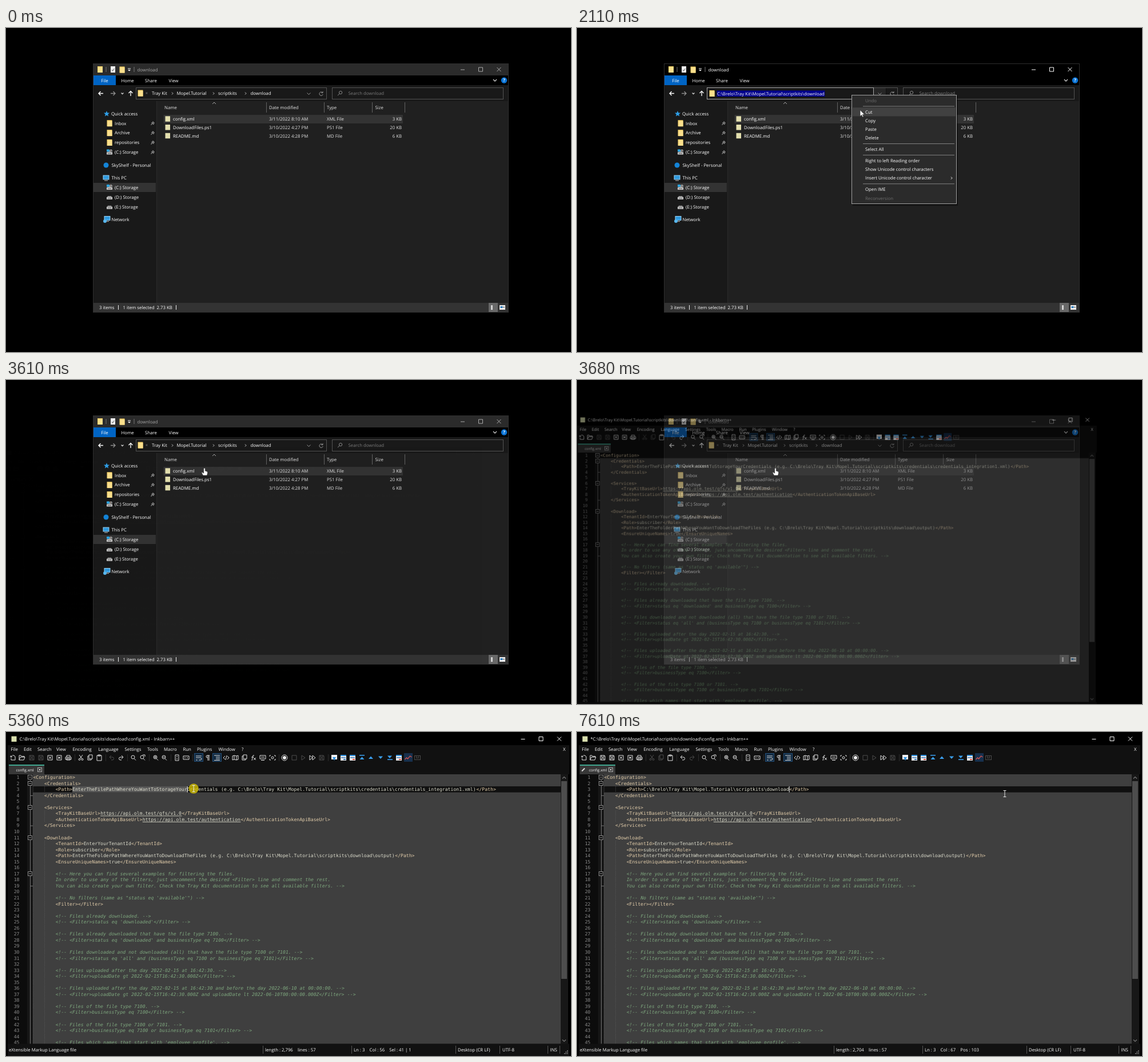
Write an HTML page with a canvas that moves like this. It is 988 px wide and 567 px high and loops after 8 s.

```html
<!DOCTYPE html>
<html lang="en">
<head>
<meta charset="utf-8">
<title>Editing a config file</title>
<style>
html, body { margin: 0; width: 100%; height: 100%; overflow: hidden; background: #000; }
canvas { display: block; }
</style>
</head>
<body>
<canvas id="stage" width="988" height="567"></canvas>
<script>
const LOOP = 8000, W = 988, H = 567;
const UI = '7.8px "Open Sans", sans-serif';
const SMALL = '6.5px "Open Sans", sans-serif';
const MONO = '8.15px "DejaVu Sans Mono", monospace';
const ITALIC = 'italic ' + MONO;
const CHROME = '#111';
const CHAR = 4.906, CODE_X = 47.4, ROW = 10.55, ROW_Y = 79.2;
const PATH_X = CODE_X + 14 * CHAR;
const FOLDER = String.raw`C:\Brelo\Tray Kit\Mopel.Tutorial\scriptkits\download`;

const screen = document.getElementById('stage').getContext('2d', { alpha: false });
const layer = Object.assign(document.createElement('canvas'), { width: W, height: H }).getContext('2d');
let g = screen;

// ---- drawing helpers ----
function box(x, y, w, h, color) { g.fillStyle = color; g.fillRect(x, y, w, h); }
function frame(x, y, w, h, color) { g.strokeStyle = color; g.lineWidth = 1; g.strokeRect(x + .5, y + .5, w - 1, h - 1); }
function text(s, x, y, color = '#fff', font = UI, align = 'left') {
  g.font = font; g.textAlign = align; g.fillStyle = color;
  g.fillText(s, x, y + 2.8);
}
// Keeps every word of code on the character grid.
function gridText(s, x, y, color, font) {
  for (const word of s.matchAll(/\S+/g)) text(word[0], x + word.index * CHAR, y, color, font);
}
function stroke(d, x, y, color = '#ddd', width = 1) {
  g.save(); g.translate(x, y);
  g.strokeStyle = color; g.lineWidth = width; g.stroke(new Path2D(d));
  g.restore();
}
function fill(d, x, y, color) {
  g.save(); g.translate(x, y);
  g.fillStyle = color; g.fill(new Path2D(d));
  g.restore();
}
function disc(x, y, r, color) {
  g.fillStyle = color; g.beginPath(); g.arc(x, y, r, 0, 7); g.fill();
}

const DOWN = 'M-3-1.5L0 1.5L3-1.5', UP = 'M-3 1.5L0-1.5L3 1.5', RIGHT = 'M-1-2L1 0L-1 2';
const CROSS = 'M-3.5-3.5l7 7M3.5-3.5l-7 7';

function windowButtons(y, xs, color) {
  stroke('M-3.5 0h7', xs[0], y + .5, color);
  stroke('M-3.5-3.5h7v7h-7z', xs[1], y, color);
  stroke(CROSS, xs[2], y, color);
}

// ---- file browser ----
function folder(x, y) {
  box(x - 4.5, y - 5.5, 9, 11, '#f3cf68');
  box(x - 3.5, y - 4, 8, 9.5, '#fbe08d');
}
function drive(x, y, system) {
  fill('M-4-1L-3-3H3L4-1z', x, y + 1, '#8d8d8d');
  box(x - 5, y, 10, 4, '#d0d0d0');
  box(x - 3.5, y + 1.5, 7, 1, '#555');
  if (system) { box(x - 5, y - 5, 5, 4, '#2ba4e0'); stroke('M1-1v-3h3v3', x, y, '#ddd'); }
}
function monitor(x, y) {
  box(x - 5.5, y - 5, 11, 8, '#9bd0f0');
  box(x - 4.5, y - 4, 9, 6, '#2f9be0');
  box(x - 3, y + 4, 6, 1, '#bbb');
}

function sidebar() {
  fill('M0-5L1.4-1.6L5-1.4L2.2.9L3.1 4.5L0 2.5L-3.1 4.5L-2.2.9L-5-1.4L-1.4-1.6z', 176, 150, '#2f9fe8');
  text('Quick access', 184, 150);
  ['Inbox', 'Archive', 'repositories', '(C:) Storage'].forEach((name, i) => {
    const y = 166.7 + i * 16.9;
    i < 3 ? folder(181, y) : drive(181, y, true);
    text(name, 190, y);
    stroke('M-3 3L-1 1M-2-1L2 2M0-3L3 0M-1-1L1-2.5M1 1L2.5-.5', 256.5, y, '#999', 1.2);
  });
  disc(175, 240, 4.5, '#1384d8');
  text('SkyShelf - Personal', 184.5, 239.8);
  monitor(175, 262.5);
  text('This PC', 184.5, 262);
  box(153, 271, 109, 16, '#333');
  ['C', 'D', 'E'].forEach((d, i) => {
    const y = 279 + i * 16.9;
    drive(181, y, i === 0);
    text(`(${d}:) Storage`, 190, y);
  });
  monitor(177, 334); disc(173, 338, 3, '#58b7ee');
  text('Network', 184.5, 335);
}

function addressBar(editing, caret) {
  frame(227, 104, 334, 21, '#535353');
  if (editing) {
    frame(227, 104, 292, 21, '#a8a8a8');
    box(519, 105, 21, 19, '#262626');
    box(540, 105, 1, 19, '#111');
    folder(236, 114.5);
    g.font = UI;
    const width = g.measureText(FOLDER).width;
    box(244.5, 109.5, width + 1, 10.5, '#00008b');
    text(FOLDER, 245, 114.8);
    if (caret) box(245.5 + width, 109, 1, 11, '#fff');
  } else {
    folder(235, 114);
    text('«', 244, 113, '#888');
    [['Tray Kit', 255], ['Mopel.Tutorial', 298.5], ['scriptkits', 371], ['download', 427.5]]
      .forEach(([name, x]) => text(name, x, 114.3));
    [291, 363, 419].forEach(x => stroke(RIGHT, x, 114.5, '#ccc'));
  }
  stroke(DOWN, 529.5, 115, '#999');
  stroke('M2.5-2A3.2 3.2 0 1 0 3.2 1M3-4v2.5h-2.5', 551, 115, '#999');
  frame(570, 104, 300, 21, '#535353');
  stroke('M-1.5-1a2.6 2.6 0 1 0 5.2 0a2.6 2.6 0 1 0-5.2 0M-.8 1L-4 4', 584, 114, '#888');
  text('Search download', 598.5, 114.3, '#7b7b7b');
}

function fileList(lit) {
  text('Name', 277, 139, '#e4e4e4');
  [['Date modified', 460], ['Type', 561], ['Size', 645.5]].forEach(([s, x]) => text(s, x, 139, '#e4e4e4'));
  [455, 556, 640, 697].forEach(x => box(x, 130, 1, 18, '#636363'));
  stroke(UP, 364, 131.5, '#aaa');
  box(275.5, 152, 418.5, 15, lit ? '#777' : '#333');
  [['config.xml', '3/11/2022 8:10 AM', 'XML File', '3 KB'],
   ['DownloadFiles.ps1', '3/10/2022 4:27 PM', 'PS1 File', '20 KB'],
   ['README.md', '3/10/2022 4:28 PM', 'MD File', '6 KB']].forEach(([name, date, type, size], i) => {
    const y = 159.3 + i * 14.75;
    box(278.5, y - 5, 8.5, 9.5, '#e3dfae');
    text(name, 292, y);
    text(date, 460, y, '#e2e2e2');
    text(type, 561, y, '#e2e2e2');
    text(size, 692, y, '#e2e2e2', UI, 'right');
  });
}

function browser(t) {
  const active = t >= 1150 && t < 3540, editing = t >= 1220 && t < 3540;
  const lit = active && (!editing || t >= 2650);
  box(152, 62, 727, 436, '#191919');
  box(264, 128, 615, 353, '#202020');
  box(263, 128, 1, 353, '#2b2b2b');
  box(152, 62, 727, 21, active ? '#000' : '#2b2b2b');
  box(152, 83, 727, 17, '#000');
  box(153, 83, 39, 17, '#0064c4');
  folder(164.5, 72.5); folder(203, 73);
  box(174.5, 68, 1, 9, '#777'); box(223.5, 68, 1, 9, '#777');
  box(183, 67, 8, 11, '#f2f2f2');
  stroke('M-2 0L-.5 2L2.5-2', 187, 73, '#777', 1.2);
  stroke('M-2.5-2h5', 215.5, 73, '#fff'); fill('M-2.5 0h5L0 2.5z', 215.5, 73, '#fff');
  text('download', 229.5, 72.8, active ? '#fff' : '#a5a5a5');
  windowButtons(72.5, [798.5, 830, 862], active ? '#fff' : '#aaa');
  [['File', 172.5], ['Home', 212.5], ['Share', 253.5], ['View', 293]]
    .forEach(([s, x]) => text(s, x, 92, '#fff', UI, 'center'));
  stroke(DOWN, 855, 91.5, '#ccc', 1.3);
  disc(871, 91.5, 5.2, '#0a74d6');
  text('?', 871, 91.5, '#fff', 'bold ' + UI, 'center');
  stroke('M4 0H-3.5M-.5-3.5L-4 0L-.5 3.5', 166, 114.5, '#fff', 1.4);
  stroke('M-4 0H3.5M.5-3.5L4 0L.5 3.5', 187, 114.5, '#8d8d8d', 1.3);
  stroke('M-2-1L0 1L2-1', 203.5, 114.5, '#ccc', 1.3);
  stroke('M0 4.5V-3.5M-3.5-.5L0-4L3.5-.5', 218, 114.5, '#fff', 1.3);
  addressBar(editing, Math.floor((t - 1220) / 530) % 2 === 0);
  sidebar();
  fileList(lit);
  box(152, 481, 727, 17, '#333');
  text('3 items', 163, 489.5);
  text('1 item selected  2.73 KB', 204.5, 489.5);
  box(196, 485, 1, 8, '#eee'); box(297, 485, 1, 8, '#eee');
  box(844, 481, 16, 16, '#686868');
  for (let i = 0; i < 4; i++) box(848, 485.5 + i * 2, 3, 1.4, '#fff');
  box(863, 485, 10, 8, '#eee'); box(864.5, 487, 4, 3, '#2677b8'); box(869, 488, 3, 1, '#444');
  frame(152, 62, 727, 436, '#2e2e2e');
}

const MENU = ['Undo', '', 'Cut', 'Copy', 'Paste', 'Delete', '', 'Select All', '', 'Right to left Reading order',
  'Show Unicode control characters', 'Insert Unicode control character', '', 'Open IME', 'Reconversion'];

function contextMenu(t) {
  if (t < 1680 || t > 3000) return;
  if (t >= 2650) {
    // The chosen item lingers and fades after the menu closes.
    g.globalAlpha = Math.min(1, (3000 - t) / 310);
    box(482, 154.3, 180, 15.2, '#414141');
    text('Copy', 504, 161.9);
    g.globalAlpha = 1;
    return;
  }
  box(482, 119, 184, 192, 'rgba(0,0,0,.4)');
  box(480, 117, 184, 191, '#2b2b2b');
  frame(480, 117, 184, 191, '#a0a0a0');
  const pointer = cursorAt(t);
  let y = 119.3;
  for (const item of MENU) {
    if (!item) { box(500, y + 2, 160, 1, '#808080'); y += 4.7; continue; }
    if (pointer.y > y && pointer.y <= y + 15.2 && t > 1900) box(482, y, 180, 15.2, '#414141');
    text(item, 504, y + 7.6, item === 'Undo' || item === 'Reconversion' ? '#6d6d6d' : '#fff');
    if (item.startsWith('Insert')) stroke(RIGHT, 655, y + 7.6, '#fff');
    y += 15.2;
  }
}

// ---- code editor ----
const CODE = String.raw`<Configuration>
    <Credentials>
        <Path>EnterTheFilePathWhereYouWantToStorageYourCredentials (e.g. C:\Brelo\Tray Kit\Mopel.Tutorial\scriptkits\credentials\credentials_integration1.xml)</Path>
    </Credentials>

    <Services>
        <TrayKitBaseUrl>https://api.olm.test/qfs/v1.0</TrayKitBaseUrl>
        <AuthenticationTokenApiBaseUrl>https://api.olm.test/authentication</AuthenticationTokenApiBaseUrl>
    </Services>

    <Download>
        <TenantId>EnterYourTenantId</TenantId>
        <Role>subscriber</Role>
        <Path>EnterTheFolderPathWhereYouWantToDownloadTheFiles (e.g. C:\Brelo\Tray Kit\Mopel.Tutorial\scriptkits\download\output)</Path>
        <EnsureUniqueNames>true</EnsureUniqueNames>

        <!-- Here you can find several examples for filtering the files.
        In order to use any of the filters, just uncomment the desired <Filter> line and comment the rest.
        You can also create your own filter. Check the Tray Kit documentation to see all available filters. -->

        <!-- No filters (same as "status eq 'available'") -->
        <Filter></Filter>

        <!-- Files already downloaded. -->
        <!-- <Filter>status eq 'downloaded'</Filter> -->

        <!-- Files already downloaded that have the file type 7100. -->
        <!-- <Filter>status eq 'downloaded' and businessType eq 7100</Filter> -->

        <!-- Files downloaded and not downloaded (all) that have the file type 7100 or 7101. -->
        <!-- <Filter>status eq 'all' and (businessType eq 7100 or businessType eq 7101)</Filter> -->

        <!-- Files uploaded after the day 2022-02-15 at 16:42:30. -->
        <!-- <Filter>uploadDate gt 2022-02-15T16:42:30.000Z</Filter> -->

        <!-- Files uploaded after the day 2022-02-15 at 16:42:30 and before the day 2022-06-10 at 00:00:00. -->
        <!-- <Filter>uploadDate gt 2022-02-15T16:42:30.000Z and uploadDate lt 2022-06-10T00:00:00.000Z</Filter> -->

        <!-- Files of the file type 7100. -->
        <!-- <Filter>businessType eq 7100</Filter> -->

        <!-- Files of the file type 7100 or 7101. -->
        <!-- <Filter>businessType eq 7100 or businessType eq 7101</Filter> -->

        <!-- Files which names that start with 'employee profile'. -->`.split('\n');

const SAVE = 'M-4-4h7l1 1v7h-8zM-2-4v3h4v-3M-2 4v-3h4v3';
const CLOSE = 'M-4-4h8v8h-8zM-2-2l4 4M2-2l-4 4';
const COPY = 'M-2-5h6v7h-6zM-2-3h-2v7h6v-2';
const FIND = 'M-4-1a3 3 0 1 0 6 0a3 3 0 1 0-6 0M1 1.5l3 3';
const TOOLS = [
  [12, 'M-1-4H2L4-2V4H-3V1M-5-2h4M-3-4v4'], [28, 'M-5 4V-4h3l1 1.5h5V-1M-5 4l2-5h8l-2 5z'],
  [45, SAVE, 'save'], [61, SAVE, 'save'], [77, CLOSE], [93, CLOSE + 'M-2 0h4'],
  [109, 'M-5-1h10v4h-10zM-3-1v-3h6v3M-3 1h6v3h-6z'],
  [131, 'M-3-5L2 2M3-5L-2 2M-4 3a1.5 1.5 0 1 0 3 0a1.5 1.5 0 1 0-3 0M1 3a1.5 1.5 0 1 0 3 0a1.5 1.5 0 1 0-3 0', 'cut'],
  [147, COPY, 'cut'], [163, 'M-4-4h8v9h-8zM-2-5h4v2h-4z'],
  [185, 'M-4-1h5a2.5 2.5 0 0 1 0 5h-2M-1-4l-3 3l3 3', 'undo'], [201, 'M4-1h-5a2.5 2.5 0 0 0 0 5h2M1-4l3 3l-3 3', 'redo'],
  [223, FIND], [239, FIND + 'M0-5h4v3'], [262, FIND + 'M-3-1h4M-1-3v4'], [277, FIND + 'M-3-1h4'],
  [299, 'M-3-5h6v10h-6zM0-3v2M0 1v2'], [315, 'M-5-3h10v6h-10zM-3 0h2M1 0h2'],
  [337, 'M-5-3H5M-5 0h8a2 2 0 0 1 0 4h-3M-5 4h3', 'on'], [353, 'M3-4h-4a2 2 0 0 0 0 4h1M0-4v9M2-4v9'],
  [369, 'M-5-4H5M-2-1H5M-2 2H5M-5 4.5H5', 'on'], [385, 'M-2-3l-3 3l3 3M2-3l3 3l-3 3M1-4l-2 8'],
  [401, 'M-5-3l3-1l4 1l3-1v7l-3 1l-4-1l-3 1zM-2-4v7M2-3v7'], [417, COPY],
  [433, 'M1-4h-2l-2 9M-4-1h4M0 0l4 4M4 0l-4 4'], [449, 'M-5-4h10v6h-10zM-3 4.5h6M-3-1h6'],
  [466, 'M-5-2v-2h2M5-2v-2h-2M-5 2v2h2M5 2v2h-2M-2 0a2 2 0 1 0 4 0a2 2 0 1 0-4 0'],
  [487, 'M-5 0a5 5 0 1 0 10 0a5 5 0 1 0-10 0'], [504, 'M-4-4h8v8h-8z', 'off'], [520, 'M-3-4l6 4l-6 4z', 'off'],
  [536, 'M-5-4l5 4l-5 4zM0-4l5 4l-5 4z'], [552, SAVE, 'off']
];

function toolbar(lit) {
  for (const [x, d, key] of TOOLS) {
    if (key === 'on') { box(x - 8, 37, 16, 15, '#12293f'); frame(x - 8, 37, 16, 15, '#24507a'); }
    stroke(d, x, 45, !key || key === 'on' || lit[key] ? '#e0e0e0' : '#4d4d4d');
  }
  disc(487, 45, 3, '#f0f0f0');
  [120, 174, 212, 250, 288, 326, 477, 563].forEach(x => box(x, 39, 1, 12, '#2c2c2c'));
  box(569, 40, 10, 8, '#f2f2f2'); fill('M-3-1h6L0 5z', 574, 45, '#2a8fe0');
  [590, 606, 687].forEach((x, i) => {
    box(x - 5, 40, 10, 10, '#f0f0f0'); box(x - 5, 40, 10, 2, '#2a8fe0');
    box(x - 4, 44, 8, 1.5, '#3a7ab8'); box(x, 47, 4, 2, i ? '#e05545' : '#3a7ab8');
  });
  const blue = '#3ba0f0', tri = 'M-4 2.5L0-2L4 2.5z', flip = 'M-4-2.5L0 2L4-2.5z';
  box(618, 40, 9, 1.5, blue); fill(tri, 622.5, 45.5, blue);
  fill(tri, 638, 44.5, blue); fill(flip, 655, 45, blue);
  fill(flip, 671, 44, blue); box(667, 47.5, 9, 1.5, blue);
  box(696, 37, 15, 15, '#17304d');
  stroke('M-6 3l3-3l2 2l4-5l3 2', 703.5, 45, '#d8504a', 1.3);
  frame(714, 41, 11, 8, '#4a4a4a');
  text('M', 719.5, 44.5, '#555', SMALL, 'center');
}

function codeLine(source, row, comment) {
  const y = ROW_Y + row * ROW, indent = source.search(/\S|$/);
  if (row) {
    for (let c = 0; c < Math.max(indent, row > 10 ? 8 : 4); c += 4) {
      for (let dy = -5; dy < 5; dy += 2) box(CODE_X + c * CHAR, y + dy, .7, 1, '#606060');
    }
  }
  if (comment) return gridText(source, CODE_X, y, '#7fa87f', ITALIC);
  let x = CODE_X + indent * CHAR;
  for (const part of source.trim().split(/(<[^>]+>)/)) {
    const width = part.length * CHAR;
    gridText(part, x, y, part[0] === '<' ? '#e3ceab' : '#dcdccc', MONO);
    if (part.startsWith('https')) box(x, y + 4, width, .8, '#dcdccc');
    x += width;
  }
}

function editor(t) {
  const pasted = t >= 7480, dragging = t >= 5090 && !pasted;
  const chars = dragging ? Math.max(0, Math.min(144, Math.round((cursorAt(t - 13).x - PATH_X + (t > 6500 ? 4 : 0)) / CHAR))) : 0;
  const current = t >= 5090 ? 2 : 0;

  box(3, 1, 982, 566, '#000');
  box(9.5, 7.5, 9, 9.5, '#d9dfae');
  text(`${pasted ? '*' : ''}${FOLDER}\\config.xml - Inkbarn++`, 23.5, 12.5);
  windowButtons(12, [904, 935.5, 967.5], '#fff');
  box(3, 23, 982, 51, CHROME);
  [['File', 8.5], ['Edit', 31], ['Search', 55], ['View', 88], ['Encoding', 116.5], ['Language', 161.5], ['Settings', 207.5],
   ['Tools', 247], ['Macro', 276], ['Run', 309.5], ['Plugins', 334], ['Window', 371.5], ['?', 412], ['X', 974]]
    .forEach(([s, x]) => text(s, x, 30));
  toolbar({ save: pasted, undo: pasted, redo: !pasted, cut: chars > 0 });

  box(5, 57, 62, 17, '#383838');
  box(5, 57, 62, 2, '#3fa58e');
  if (pasted) stroke('M-3 3L2-2', 11.5, 65.5, '#ddd', 2);
  text('config.xml', pasted ? 21 : 17.5, 65.8, '#fff', SMALL);
  frame(55, 62, 8, 8, '#aaa'); stroke('M-1.5-1.5l3 3M1.5-1.5l-3 3', 59, 66, '#ddd');

  box(3, 74, 44, 472, '#0c0c0c');
  box(37, 74, 10, 472, '#161616');
  box(47, 74, 923, 472, '#3f3f3f');
  box(47, 74 + current * ROW, 923, ROW, '#101010');
  box(PATH_X, 74 + 2 * ROW, chars * CHAR, ROW, '#585858');
  box(42, 84, 1, 462, '#777');
  [3, 8, 18].forEach(r => box(42, ROW_Y + r * ROW, 5, 1, '#777'));

  let comment = false;
  CODE.forEach((source, row) => {
    if (source.includes('<!--')) comment = true;
    const shown = pasted && row === 2 ? `        <Path>${FOLDER}</Path>` : source;
    codeLine(shown, row, comment);
    if (source.includes('-->')) comment = false;
    text(row + 1, 23.5, ROW_Y + row * ROW, '#8a8a8a', MONO, 'right');
  });
  [0, 1, 5, 10, 16].forEach(r => {
    const y = Math.round(ROW_Y + r * ROW);
    box(38, y - 4, 8, 8, '#0c0c0c');
    frame(38, y - 4, 8, 8, '#8a8a8a');
    box(40, y - .5, 4, 1, '#aaa');
  });

  const since = pasted ? 7480 : t >= 6540 ? 6540 : t >= 5090 ? t : 3830;
  if (Math.floor((t - since) / 530) % 2 === 0) {
    const x = pasted ? PATH_X + 52 * CHAR : current ? PATH_X + chars * CHAR : CODE_X;
    box(x - .5, 74 + current * ROW, 1, ROW, '#fff');
  }

  box(970, 74, 13, 472, '#171717');
  box(971, 86, 10, 346, '#4d4d4d');
  stroke(UP, 976, 80, '#777', 1.2); stroke(DOWN, 976, 540, '#777', 1.2);

  box(3, 545.5, 982, 21.5, CHROME);
  const col = pasted ? 67 : current ? 15 + chars : 1;
  const tail = chars ? `Sel : ${chars} | 1` : `Pos : ${current ? col + 36 : 1}`;
  text('eXtensible Markup Language file', 5, 556.3);
  text(`length : ${pasted ? '2,704' : '2,796'}    lines : 57`, 453, 556.3);
  text(`Ln : ${current + 1}    Col : ${col}    ${tail}`, 608, 556.3);
  [['Desktop (CR LF)', 790], ['UTF-8', 868], ['INS', 951.5]].forEach(([s, x]) => text(s, x, 556.3));
  [449, 604, 786, 863, 947, 968].forEach(x => box(x, 549, 1, 14, '#555'));
  for (let i = 0; i < 3; i++) for (let j = 0; j <= i; j++) box(981 - j * 2.5, 557 + i * 2.5, 1.4, 1.4, '#aaa');
}

// ---- pointer: time, x, y, eased ----
const TRACK = [
  [400, 906, 567], [1080, 480, 117, 1], [1630, 480, 117], [2240, 497, 147, 1], [2380, 499, 157],
  [2760, 499, 157], [3400, 347, 154, 1], [3700, 347, 154], [3820, 196, 123], [4230, 123, 106, 1],
  [4890, 117, 101, 1], [5090, 116.5, 101], [5360, 328, 99], [5840, 386, 100], [6540, 821, 101],
  [6830, 821, 101], [7000, 821, 107], [7270, 821, 107], [7610, 748, 108, 1]
];

function cursorAt(t) {
  const i = TRACK.findIndex(k => k[0] > t);
  if (i < 0) return { x: 748, y: 108 };
  if (i === 0) return { x: 906, y: 567 };
  const [t0, x0, y0] = TRACK[i - 1], [t1, x1, y1, eased] = TRACK[i];
  let u = (t - t0) / (t1 - t0);
  if (eased) u = u * u * (3 - 2 * u);
  return { x: x0 + (x1 - x0) * u, y: y0 + (y1 - y0) * u };
}

function pointer(t) {
  if (t < 400) return;
  const { x, y } = cursorAt(t);
  const within = (a, b) => t >= a && t < b;
  if (within(1490, 1630)) disc(x, y, 8.7, 'rgba(190,0,22,.8)');
  if (within(1150, 1220) || within(2450, 2650) || within(3440, 3540) || within(5090, 6810)) disc(x, y, 8.7, 'rgba(215,195,0,.78)');
  const shape = within(400, 1220) || within(1680, 3250) ? 'arrow' : within(3250, 3700) ? 'hand' : 'beam';
  if (shape === 'beam') {
    stroke('M-2.5-5.5H2.5M0-5.5V5.5M-2.5 5.5H2.5', x, y, '#e6e6e6');
    return;
  }
  const d = shape === 'arrow'
    ? 'M0 0V11L2.6 8.6L4.4 12.4L6 11.7L4.3 8H7.8z'
    : 'M-1.3 1Q0-1 1.3 1V5L4.5 6Q6 6.5 5.5 9L4.5 13H-2.5L-5 8Q-4.5 6.5-3 8L-1.3 9z';
  fill(d, x, y, '#fff');
  stroke(d, x, y, '#222', .6);
}

function draw(t) {
  g = screen;
  box(0, 0, W, H, '#000');
  const shown = 1 - (1 - Math.max(0, Math.min(1, (t - 3610) / 190))) ** 1.5;
  if (shown < 1) {
    browser(t);
    contextMenu(t);
    if (shown > 0) {
      g = layer;
      editor(t);
      g = screen;
      // The new window grows from a point below the lower left corner.
      const s = .85 + .15 * shown;
      g.globalAlpha = shown;
      g.drawImage(layer.canvas, -40 * (1 - s), 787 * (1 - s), W * s, H * s);
      g.globalAlpha = 1;
    }
  } else {
    editor(t);
  }
  pointer(t);
}

for (const c of [screen, layer]) c.textRendering = 'geometricPrecision';
const start = performance.now();
function tick() {
  draw((performance.now() - start) % LOOP);
  requestAnimationFrame(tick);
}
tick();
</script>
</body>
</html>
```
